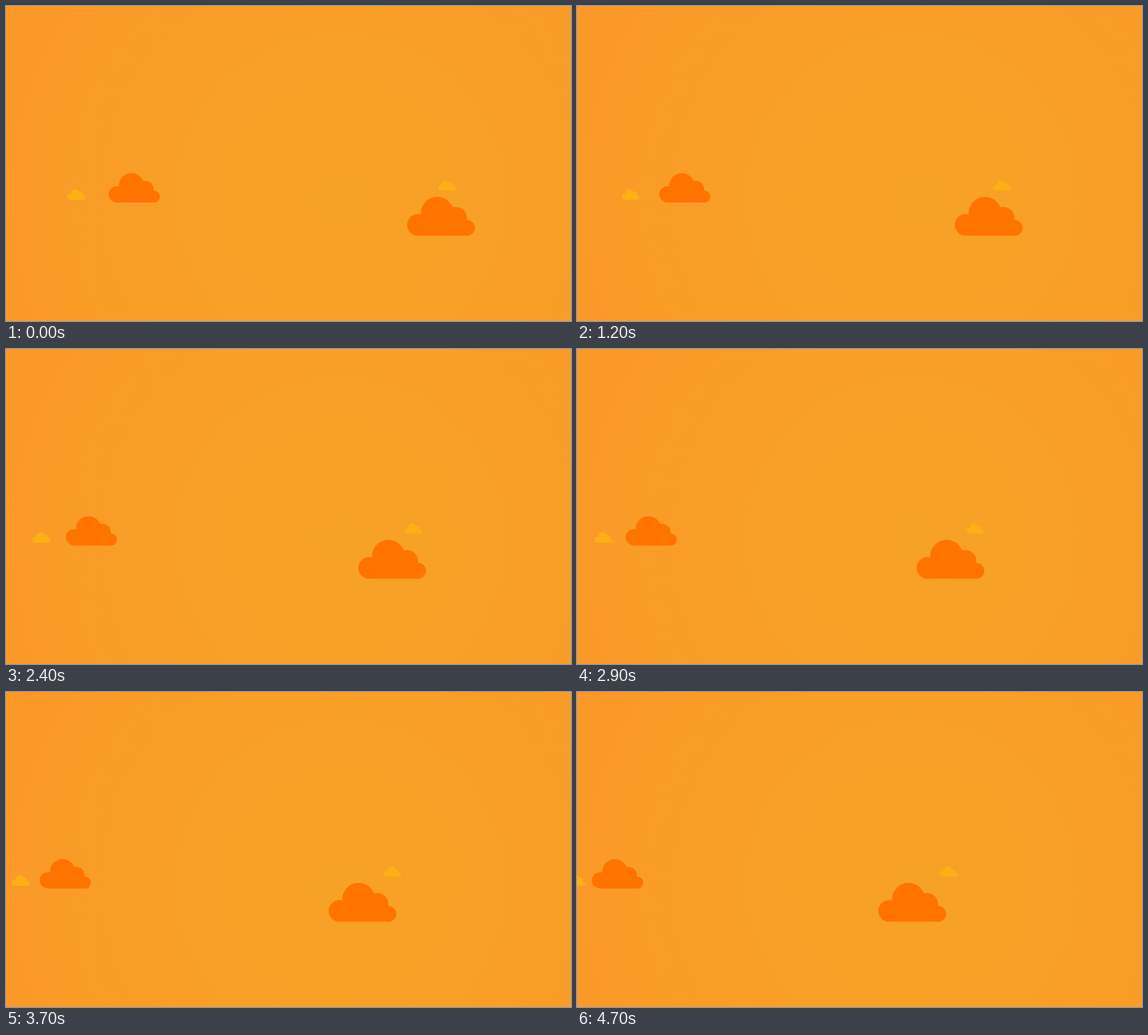
These frames come from a looping animation (600 by 335 pixels, 4.8 s). An HTML page:

```html
<!DOCTYPE html>
<html lang="en">
<head>
<meta charset="utf-8">
<title>Drifting clouds</title>
<style>
  html, body { margin: 0; width: 100%; height: 100%; overflow: hidden; background: #f99c28; }
  svg { display: block; width: 100vw; height: 100vh; }
</style>
</head>
<body>
<svg viewBox="0 0 600 335" preserveAspectRatio="none">
  <defs>
    <radialGradient id="glow" gradientUnits="userSpaceOnUse" cx="355" cy="204" r="420">
      <stop offset="0" stop-color="#f6a226"/>
      <stop offset=".36" stop-color="#f8a027"/>
      <stop offset=".74" stop-color="#fa9b28"/>
      <stop offset="1" stop-color="#fc9628"/>
    </radialGradient>
    <g id="cloud">
      <circle cx="32" cy="17.5" r="17.5"/>
      <circle cx="51.5" cy="22.8" r="12"/>
      <circle cx="11.5" cy="29.8" r="11.5"/>
      <circle cx="63.5" cy="33" r="8.5"/>
      <path d="M11.5 24H58L64 33V41.3H11.5Z"/>
    </g>
  </defs>
  <rect width="600" height="335" fill="url(#glow)"/>
  <g id="sky"></g>
</svg>
<script>
  const LOOP = 4800, STEP = 100;
  // Steps at which the drift pauses for one beat.
  const HELD = new Set([12, 24, 36, 42]);
  // speed is in pixels per step
  const clouds = [
    { x: 65, y: 195, scale: 0.264, speed: 1.596, fill: '#fcb016' },
    { x: 459, y: 185.6, scale: 0.26, speed: 1.57, fill: '#fcb016' },
    { x: 109, y: 177.7, scale: 0.755, speed: 1.98, fill: '#ff7300' },
    { x: 426, y: 203, scale: 1, speed: 2.255, fill: '#ff7300' }
  ];
  const sky = document.getElementById('sky');

  for (const c of clouds) {
    c.node = document.createElementNS('http://www.w3.org/2000/svg', 'use');
    c.node.setAttribute('href', '#cloud');
    c.node.setAttribute('fill', c.fill);
    sky.append(c.node);
  }

  function draw(ms) {
    const step = Math.floor((ms % LOOP) / STEP);
    const moved = HELD.has(step) ? step - 1 : step;
    for (const c of clouds) {
      const x = c.x - c.speed * moved;
      c.node.setAttribute('transform', `translate(${x} ${c.y}) scale(${c.scale})`);
    }
  }

  function tick() {
    draw(performance.now());
    requestAnimationFrame(tick);
  }
  tick();
</script>
</body>
</html>
```
